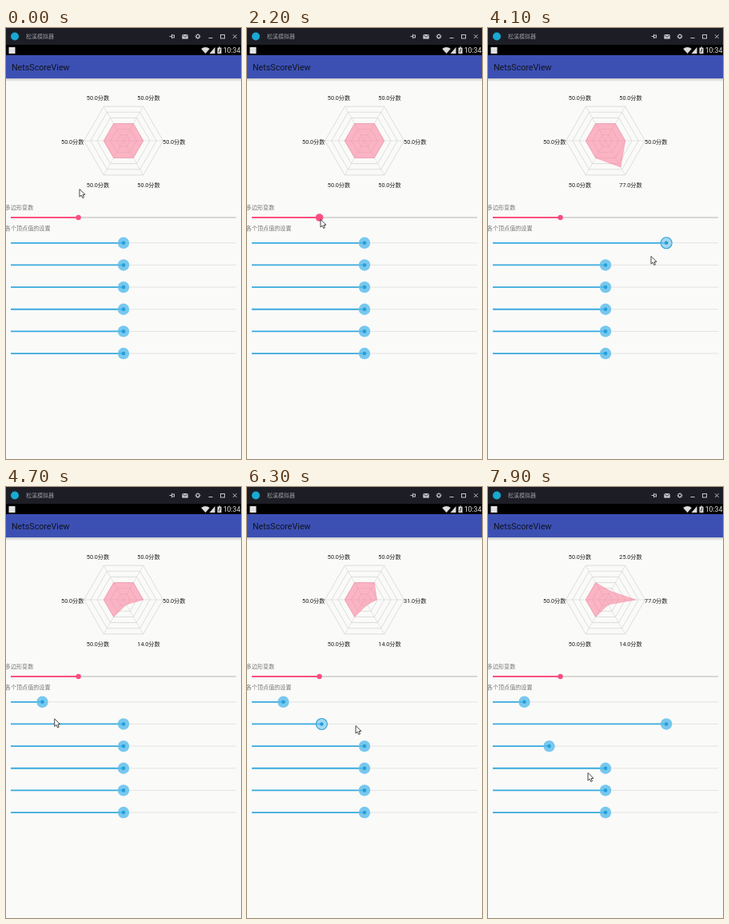
An HTML page with a canvas for the animation above (8 s loop, 294 by 539 pixels).

```html
<!DOCTYPE html>
<html lang="zh">
<head>
<meta charset="utf-8">
<style>
  html, body { margin: 0; width: 100%; height: 100%; overflow: hidden; background: #fafaf9; }
  canvas { display: block; width: 294px; height: 539px; }
</style>
</head>
<body>
<canvas id="stage"></canvas>
<script>
const W = 294, H = 539, LOOP = 8000, STEP = 100;
const TRACK_LEFT = 6, TRACK_WIDTH = 282, MAX_SIDES = 20;
const CENTER = { x: 147, y: 141 }, RADIUS = 49.5, LABEL_RADIUS = 63.5, RINGS = 6;
const FONT = 'Roboto, "Noto Sans CJK SC", "Noto Sans CJK", sans-serif';
const BAR = '#1d1e25', ICON = '#c4c5c9', STATUS = '#ddd', PINK = '#fb4f80';

// A dragged thumb follows the pointer with this delay.
const LAG = 70;

const pointerStart = { x: 92, y: 201 };
const pointerMoves = [
  { from: 100, to: 600, x: 91, y: 237 },
  { from: 1000, to: 1500, x: 120, y: 238 },
  { from: 1800, to: 2200, x: 92, y: 239 },
  { from: 2500, to: 2900, x: 147, y: 273 },
  { from: 3000, to: 3800, x: 230, y: 276 },
  { from: 4000, to: 4100, x: 204, y: 285 },
  { from: 4100, to: 4500, x: 45.5, y: 288 },
  { from: 4500, to: 5300, x: 143, y: 297 },
  { from: 5400, to: 5500, x: 179, y: 296 },
  { from: 5500, to: 5800, x: 224, y: 297 },
  { from: 5800, to: 6100, x: 49, y: 298 },
  { from: 6100, to: 6500, x: 223, y: 298 },
  { from: 6700, to: 7100, x: 148, y: 327 },
  { from: 7200, to: 7600, x: 76.5, y: 329 },
  { from: 7600, to: 7900, x: 125, y: 357 }
];
const sideDrag = { from: 1000, to: 2500 };
const valueDrags = [{ from: 3000, to: 4500 }, { from: 5500, to: 6700 }, { from: 7200, to: 7600 }];

const canvas = document.getElementById('stage');
const ctx = canvas.getContext('2d');
const scale = window.devicePixelRatio || 1;
canvas.width = W * scale;
canvas.height = H * scale;

const smooth = p => p * p * (3 - 2 * p);

function pointerAt(t) {
  let { x, y } = pointerStart;
  for (const move of pointerMoves) {
    const p = smooth(Math.min(1, Math.max(0, (t - move.from) / (move.to - move.from))));
    x += (move.x - x) * p;
    y += (move.y - y) * p;
  }
  return { x, y };
}

const isPressed = (drag, t) => !!drag && t >= drag.from && t <= drag.to;

function sliderValue(drag, t, max, initial) {
  if (!drag || t < drag.from) return initial;
  const { x } = pointerAt(Math.min(t - LAG, drag.to));
  return Math.round((x - TRACK_LEFT) / TRACK_WIDTH * max);
}

function rect(x, y, w, h, color) {
  ctx.fillStyle = color;
  ctx.fillRect(x, y, w, h);
}

function paint(fill, stroke, width) {
  if (fill) { ctx.fillStyle = fill; ctx.fill(); }
  if (stroke) { ctx.strokeStyle = stroke; ctx.lineWidth = width; ctx.stroke(); }
}

function circle(x, y, r, fill, stroke, width = 1) {
  ctx.beginPath();
  ctx.arc(x, y, r, 0, Math.PI * 2);
  paint(fill, stroke, width);
}

function shape(points, fill, stroke, width = 1, closed = true) {
  ctx.beginPath();
  points.forEach(([x, y]) => ctx.lineTo(x, y));
  if (closed) ctx.closePath();
  paint(fill, stroke, width);
}

const line = (x1, y1, x2, y2, color, width = 1) =>
  shape([[x1, y1], [x2, y2]], null, color, width, false);

function text(str, x, y, size, color, align = 'left') {
  ctx.font = `${size}px ${FONT}`;
  ctx.textAlign = align;
  ctx.fillStyle = color;
  ctx.fillText(str, x, y);
}

function drawWindowBar() {
  rect(0, 0, W, 21, BAR);
  circle(11, 10.5, 5, '#19a9d2');
  text('松溪模拟器', 25, 13.2, 7, '#9c9da3');
  // pin
  line(204.5, 10.5, 207.5, 10.5, ICON);
  line(207.5, 7.8, 207.5, 13.2, ICON);
  ctx.strokeRect(207.5, 9, 3, 3);
  // mail
  rect(220.3, 8, 7.4, 5.6, ICON);
  shape([[220.3, 8.3], [224, 11.3], [227.7, 8.3]], null, BAR, 0.8, false);
  // gear
  circle(240, 10.5, 2, null, ICON, 1.2);
  for (let a = 0; a < Math.PI * 2; a += Math.PI / 4) {
    const c = Math.cos(a), s = Math.sin(a);
    line(240 + c * 2.3, 10.5 + s * 2.3, 240 + c * 3.4, 10.5 + s * 3.4, ICON);
  }
  // minimize, maximize, close
  line(253.5, 12.5, 258.5, 12.5, ICON);
  ctx.strokeRect(268.5, 8.5, 5, 4.5);
  line(284, 8.3, 288.6, 12.9, ICON);
  line(288.6, 8.3, 284, 12.9, ICON);
}

function drawStatusBar() {
  rect(0, 21, W, 13, '#000');
  rect(3.5, 24, 8, 8, '#e4e4e4');
  // wifi, signal, battery
  ctx.beginPath();
  ctx.moveTo(249.5, 32);
  ctx.arc(249.5, 32, 8, -Math.PI * 0.73, -Math.PI * 0.27);
  paint(STATUS);
  shape([[254.5, 32], [261.5, 32], [261.5, 24]], STATUS);
  rect(264.5, 24.6, 5, 7.4, STATUS);
  rect(266, 23.6, 2, 1, STATUS);
  line(267.6, 26, 266.4, 30.6, '#222');
  text('10:34', 293.3, 31.2, 8.7, '#e2e2e2', 'right');
}

function drawAppBar() {
  const shadow = ctx.createLinearGradient(0, 63, 0, 67);
  shadow.addColorStop(0, 'rgba(0,0,0,.2)');
  shadow.addColorStop(1, 'rgba(0,0,0,0)');
  rect(0, 63, W, 4, shadow);
  rect(0, 34, W, 29, '#3c50b4');
  text('NetsScoreView', 7, 52.9, 10.7, '#11131f');
}

function drawRadar(sides, values) {
  const step = Math.floor(360 / sides);
  const start = sides % 2 ? 0 : step / 2;
  const corners = radiusOf => values.map((_, i) => {
    const a = (start + i * step) * Math.PI / 180, r = radiusOf(i);
    return [CENTER.x + r * Math.sin(a), CENTER.y + r * Math.cos(a)];
  });

  for (let ring = 1; ring <= RINGS; ring++) {
    shape(corners(() => RADIUS * ring / RINGS), null, '#cacaca', 0.6);
  }
  corners(() => RADIUS).forEach(([x, y]) => line(CENTER.x, CENTER.y, x, y, '#d4d4d4', 0.6));
  shape(corners(i => RADIUS * values[i] / 100), 'rgba(254,125,152,.55)', 'rgba(240,90,130,.45)', 0.6);
  corners(() => LABEL_RADIUS).forEach(([x, y], i) =>
    text(values[i].toFixed(1) + '分数', x - 0.2, y + 3.5, 7.2, '#1c1c1c', 'center'));
}

function drawSideSlider(sides, pressed) {
  const x = TRACK_LEFT + TRACK_WIDTH * sides / MAX_SIDES, y = 237;
  line(TRACK_LEFT, y, TRACK_LEFT + TRACK_WIDTH, y, '#cbcbcb', 1.4);
  line(TRACK_LEFT, y, x, y, PINK, 1.8);
  circle(x, y, pressed ? 4.8 : 3.2, PINK);
}

function drawValueSlider(row, value, pressed) {
  const x = TRACK_LEFT + TRACK_WIDTH * value / 100, y = 268.8 + row * 27.65;
  line(TRACK_LEFT, y, TRACK_LEFT + TRACK_WIDTH, y, '#e3e3e3');
  line(TRACK_LEFT, y, x, y, '#38aade', 1.8);
  if (pressed) circle(x, y, 7, '#a3d9f2', '#2fa0d6', 1.1);
  else circle(x, y, 7.2, '#77c8ee');
  line(x - 6.5, y, x, y, '#4fb4e4', 1.6);
  circle(x, y, 2.3, '#259fd9');
}

function drawCursor({ x, y }) {
  const outline = [[0, 0], [0, 9.6], [2.2, 7.6], [3.8, 11], [5.5, 10.2], [4, 7], [7, 6.8]];
  shape(outline.map(([dx, dy]) => [x + dx, y + dy + 0.5]), '#fff', '#333', 0.9);
}

function draw(t) {
  const sides = sliderValue(sideDrag, t, MAX_SIDES, 6);
  const values = Array.from({ length: sides }, (_, row) => sliderValue(valueDrags[row], t, 100, 50));

  ctx.setTransform(scale, 0, 0, scale, 0, 0);
  rect(0, 0, W, H, '#fafaf9');
  drawWindowBar();
  drawStatusBar();
  drawAppBar();
  drawRadar(sides, values);
  text('多边形变数', -1.2, 226.5, 7.1, '#757575');
  drawSideSlider(sides, isPressed(sideDrag, t));
  text('各个顶点值的设置', -1.2, 253.2, 7.1, '#757575');
  values.forEach((value, row) => drawValueSlider(row, value, isPressed(valueDrags[row], t)));
  drawCursor(pointerAt(t));
}

function tick() {
  draw(Math.floor(performance.now() % LOOP / STEP) * STEP);
  requestAnimationFrame(tick);
}
tick();
</script>
</body>
</html>
```
